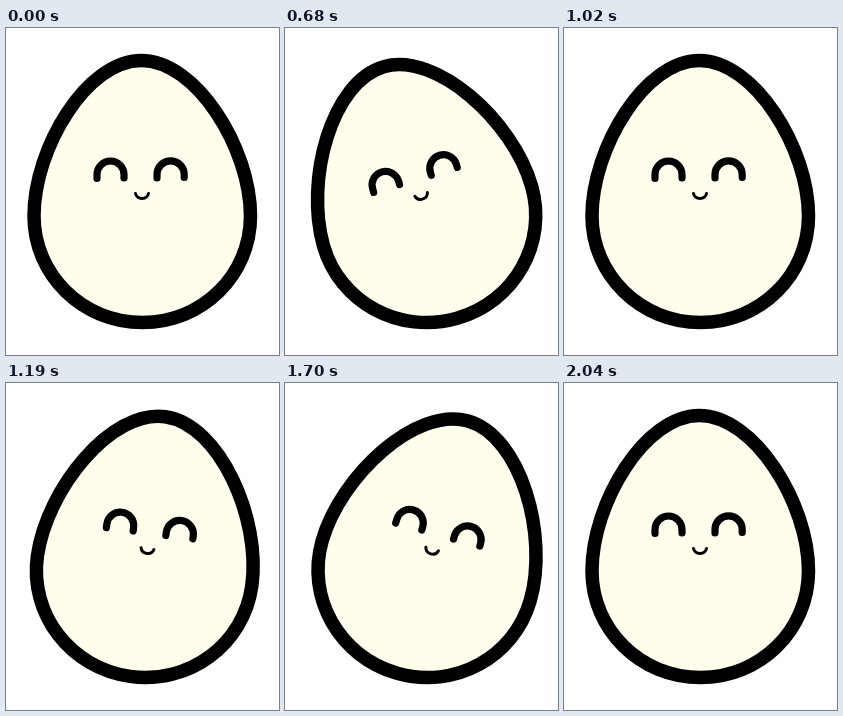
Write an HTML page that moves like this. It is 273 by 327 pixels and loops after 2.16 s.

```html
<!DOCTYPE html>
<html lang="en">
<head>
<meta charset="utf-8">
<title>Wobbling egg</title>
<style>
  html, body { margin: 0; width: 100%; height: 100%; overflow: hidden; background: #fff; }
  svg { display: block; width: 273px; height: 327px; }
  #egg { fill: none; stroke: #000; stroke-width: 7.2; stroke-linecap: round; }
  .shell { fill: #fffeec; stroke-width: 13.5; }
  .mouth { stroke-width: 3; }
</style>
</head>
<body>
<svg viewBox="0 0 273 327">
  <g id="egg">
    <path class="shell" d="M135.3 32.4C190 32.4 244.5 120 244.5 188C244.5 247 196.5 294.5 136.5 294.5S28 247 28 188C28 120 81 32.4 135.3 32.4Z"/>
    <path id="eyes" d="M91 150.5v-4a13.5 13.5 0 0 1 27 0v3.5M151 150v-3.5a13.6 13.6 0 0 1 27.2 0v3"/>
    <path class="mouth" d="M129.5 165.5C131 172 141 172 142.5 165.5"/>
  </g>
</svg>
<script>
  const LOOP = 2160, STEP = 170;
  const TILT = [0, 8, 16, 21, 16, 8];    // degrees, one swing to a side
  const DRIFT = [0, 2.7, 5.6, 7.4, 5.6, 2.7];
  const egg = document.getElementById('egg');
  const eyes = document.getElementById('eyes');

  function draw(now) {
    const step = Math.floor(now % LOOP / STEP);
    const pose = step % 6;
    const side = step < 6 ? -1 : 1;
    egg.setAttribute('transform',
      `translate(${DRIFT[pose]} 0) rotate(${side * TILT[pose]} 136.5 185.5)`);
    // The eyes slide along with the swing to the right.
    eyes.setAttribute('transform', `translate(${Math.max(side, 0) * DRIFT[pose] / 2} 0)`);
    requestAnimationFrame(draw);
  }
  draw(0);
</script>
</body>
</html>
```
